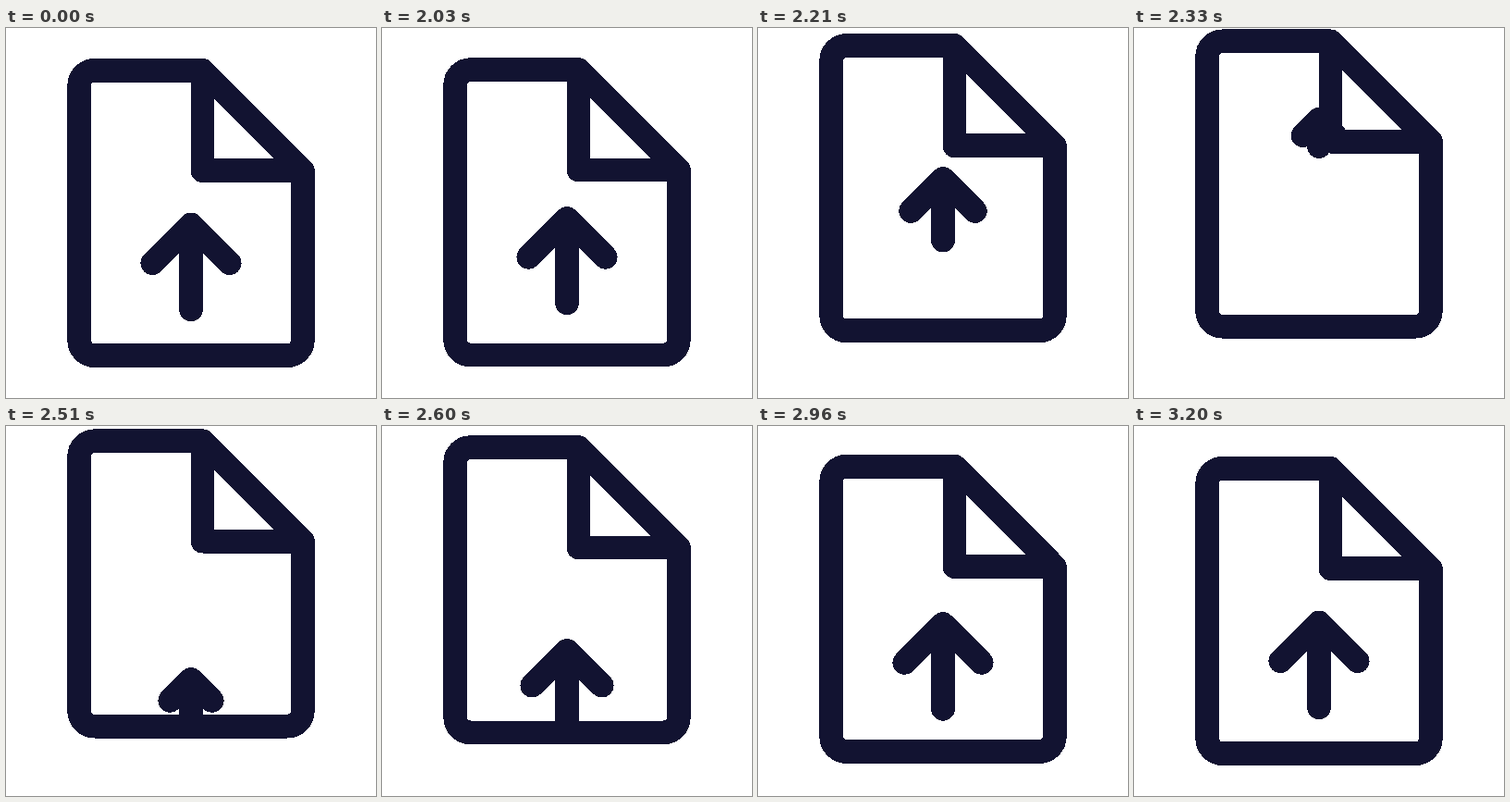
These frames come from a looping animation (400x400 px, 3.23 s). An HTML page:

```html
<!DOCTYPE html>
<html lang="en">
<head>
<meta charset="utf-8">
<title>File upload</title>
<style>
  html, body { margin: 0; width: 100%; height: 100%; overflow: hidden; background: #fff; }
  svg { display: block; width: 100%; height: 100%; shape-rendering: crispEdges; }
  path { fill: none; stroke: #121331; stroke-width: 25.8; stroke-linecap: round; stroke-linejoin: round; }
</style>
</head>
<body>
<svg viewBox="0 0 400 400">
  <path id="page" d="M212.5 45.83H95.83a16.67 16.67 0 0 0-16.66 16.67v275a16.67 16.67 0 0 0 16.66 16.67h208.34a16.67 16.67 0 0 0 16.66-16.67V154.17zV154.17H320.83"/>
  <path id="arrow"/>
</svg>
<script>
const LOOP = 3230, HOLD = 2030, STEP = 30;
const LEAVE = 2000, RETURN = 2400, END = 3200;
const TIP = 212.5, HEAD = 41.67, SHAFT = 91.67, TOP = 45.83, BOTTOM = 354.17, LIFT = 32;
const page = document.getElementById('page');
const arrow = document.getElementById('arrow');

// Cubic bezier easing with control points (x1, 0) and (x2, 1)
function ease(x, x1, x2) {
  let low = 0, high = 1;
  for (let i = 0; i < 24; i++) {
    const s = (low + high) / 2, r = 1 - s;
    if (3 * x1 * s * r * r + 3 * x2 * s * s * r + s ** 3 < x) low = s;
    else high = s;
  }
  return low * low * (3 - 2 * low);
}

function drawArrow(tip, head, bottom) {
  arrow.setAttribute('d',
    `M${200 - head} ${tip + head}L200 ${tip}L${200 + head} ${tip + head}M200 ${tip}V${bottom}`);
}

function draw(time) {
  const t = time < HOLD ? LEAVE : HOLD + Math.floor((time - HOLD) / STEP) * STEP;
  let lift = 0;
  if (t < RETURN) {
    // The arrow shrinks into the top edge
    const u = (t - LEAVE) / (RETURN - LEAVE);
    lift = LIFT * ease(u, 0.33, 0.15);
    const tip = TIP + (TOP - LIFT - TIP) * (0.43 * u + 0.57 * u ** 5);
    drawArrow(tip, HEAD * (1 - u ** 2.8), tip + SHAFT * (1 - u * u));
  } else if (t < END) {
    // A new arrow grows out of the bottom edge
    lift = LIFT * (1 - ease((t - RETURN) / (END - RETURN), 0.33, 0.24));
    const edge = BOTTOM - lift;
    const drop = 146 * Math.exp((RETURN - t) / 128) - 0.2;
    const grow = Math.max(0, Math.min(1, (109 - drop) / 87));
    drawArrow(Math.min(edge, TIP + drop), HEAD * grow, Math.min(edge, TIP + SHAFT + drop));
  } else {
    drawArrow(TIP, HEAD, TIP + SHAFT);
  }
  page.setAttribute('transform', `translate(0 ${-lift})`);
}

const start = performance.now();
function tick() {
  draw((performance.now() - start) % LOOP);
  requestAnimationFrame(tick);
}
tick();
</script>
</body>
</html>
```
